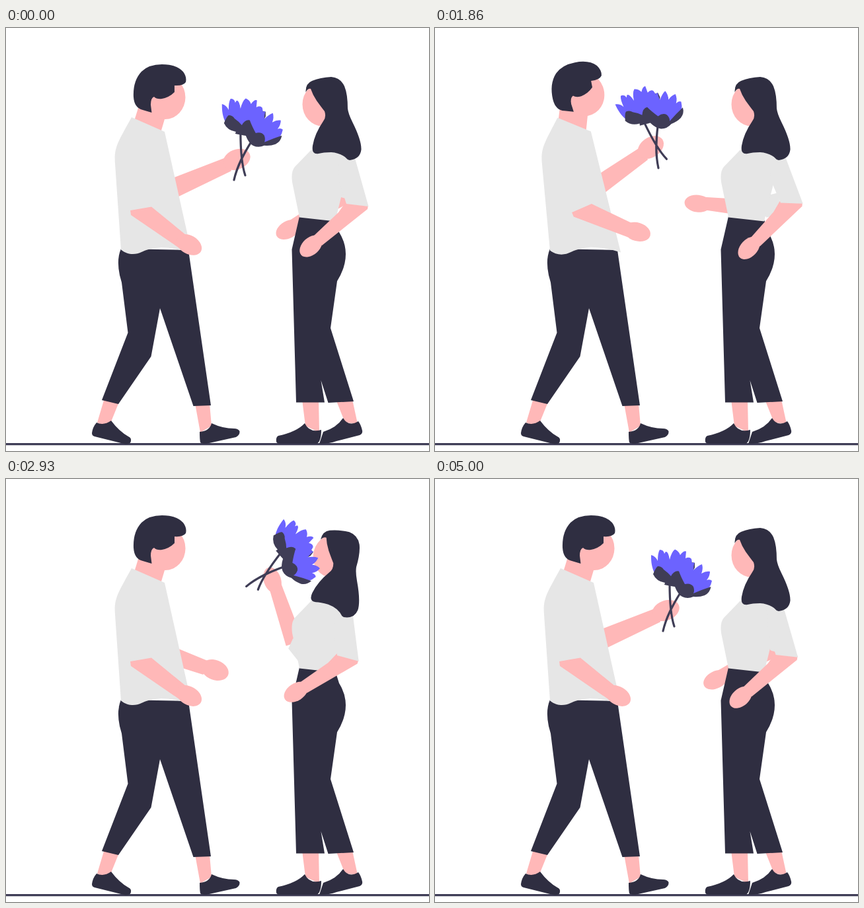
An HTML page for the animation above (5070 ms loop, 640 by 640 pixels).

```html
<!DOCTYPE html>
<html lang="en">
<head>
<meta charset="utf-8">
<title>Sharing a flower</title>
<style>
  html, body { margin: 0; width: 100%; height: 100%; overflow: hidden; background: #fff; }
  svg { display: block; width: 100%; height: 100%; }
  .dark { fill: #2f2e41; }
  .skin { fill: #ffb8b8; }
  .cloth { fill: #e6e6e6; }
  .leaf { fill: #3f3d56; }
  .petal { fill: #6c63ff; }
  .line { fill: none; stroke: #3f3d56; stroke-width: 3.2; stroke-linecap: round; }
</style>
</head>
<body>
<svg viewBox="0 0 640 640">
  <path class="line" d="M-5 629.6H645"/>

  <!-- man -->
  <g id="manFarArm" class="skin">
    <path d="M-12 -9L-96 -11L-125 -13V22L-102 18L-14 13Z"/>
    <ellipse rx="21.5" ry="15"/>
  </g>
  <path class="skin" d="M149 560L138 597Q148 603 158 598L171 566ZM286 568L294 612L311 602L308 568Z"/>
  <path class="dark" d="M137 597Q131 604 130 613Q130 617 134 618L178 629Q188 631 189 625Q190 620 185 618Q171 610 159 594Q148 602 137 597Z"/>
  <path class="dark" d="M293 611Q293 622 294 627Q296 629 303 629L348 619Q354 616 353.500 610Q351 606 345 606Q328 606 311 598Q308 610 293 611Z"/>
  <path class="dark" d="M174 334Q167 350 172 374L175 385L184.500 461L145 563L170 569L219.500 497L233 424L283.500 572L310 571L276 336Z"/>
  <g id="manHead">
    <path class="skin" d="M201 118L188 160L232 165L243 128Z"/>
    <ellipse class="skin" cx="241" cy="105" rx="30.500" ry="33"/>
    <path class="dark" d="M220.500 128L207 124Q194 121 193 104Q192 80 205 66Q216 55 236 55Q258 55 268 66Q274 74 272 82Q268 88 255 87V97Q247 105 236 107Q228 108 224 104Q219 106 219 116Z"/>
  </g>
  <path id="manShirt" class="cloth" d="M190 135L240 157L281 341Q255 332 235 332C220 333 211 336 205 339C197 343 184 344 174 335.500L165 205C163 180 170 172 190 135Z"/>
  <g id="manNearArm" class="skin">
    <path d="M188 276L220 270.500L272 313L262 333L189 283Z"/>
    <ellipse rx="20.500" ry="14" transform="translate(277 328) rotate(30)"/>
  </g>

  <!-- woman -->
  <g id="womanFarArm">
    <path class="skin" d="M9 -11L66 -14L101 -18V11L11 8.400Z"/>
    <ellipse class="skin" rx="20" ry="13"/>
    <path class="cloth" d="M94 -2L106 9L130 0L118 -30L92 -20Z"/>
  </g>
  <path class="skin" d="M448 562L453 602L474 612L473 562ZM499 562L513 597L532 599L524 562Z"/>
  <path class="dark" d="M510 590Q500 605 480 611L474 629Q490 629 500 625L535 616Q540 614 539 609Q537 600 533 595Q518 604 510 590Z"/>
  <path class="dark" d="M452 598Q440 611 412 617Q408 619 409 626Q410 629 415 629L470 629Q477 626 477 608Q459 613 452 598Z"/>
  <path class="dark" d="M444 285L432.500 335L439 566.500H482L476.500 533L487.500 567L526 565L491 454L501 383Q514 362 514 342Q514 325 504 309L498 290Z"/>
  <path class="cloth" d="M468 178L437 210Q431 217 433 233L444 286.500L498 292.500L513 232L525 195L500 172Z"/>
  <g id="womanNearArm">
    <path class="skin" d="M548 268L547 274L478 329L465 315L503 279L515 262Z"/>
    <ellipse class="skin" rx="20" ry="13" transform="translate(461.500 330) rotate(-42)"/>
    <path class="cloth" d="M528 197L548.500 270L515 266L504 233L500 180Z"/>
  </g>
  <g id="womanHead">
    <ellipse class="skin" cx="479" cy="115.500" rx="30.500" ry="33"/>
    <path class="dark" d="M453.500 97Q453 84 463 80Q475 75 492 74Q506 75 512 88Q517 100 517 122Q518 130 524 142Q538 170 537.500 184Q536 198 520 200L517 199Q508 189 492 188Q480 188 473 190Q462 192 464 178Q467 160 480 141Q485 135 482 126Q478 121 470 110Q464 101 461 92Q457 91 453.500 97Z"/>
  </g>

  <g id="flower"><g transform="translate(-357 -196)">
    <path class="line" d="M355 158C355 180 356 205 362 223M372 171C360 190 350 208 345 230"/>
    <path class="leaf" d="M388 126L393 127V134L390 140Z"/>
    <path class="petal" d="M331 140C327 130 327 122 327 115Q334 117 337 124Q337 112 340 107Q346 107 347 113L349 110Q353 109 355 122Q358 110 363 106.500Q369 109 371 115Q376 108 380 109.500L379 120Q385 117 388 121L389 127L392.500 126Q391 132 391 138Q398 131 404 129Q406 136 403 143Q410 139 416 140Q416 147 411 153Q416 151 419 154Q418 160 414 166L391 174L372 162L340 152Z"/>
    <path class="leaf" d="M330 144Q334 134 337 132Q343 132 346 137Q353 142 357 147Q362 138 369 139.500Q372 148 378 159Q387 157 391 163Q393 169 391 173Q405 167 417.500 163Q416 172 408 176Q400 179 391 178Q382 182 374 178Q367 174 363 163Q357 162 347 160L348 157Q335 155 330 144Z"/>
  </g></g>
</svg>
<script>
const LOOP = 5070;

// flower x y turn, man far arm x y turn, woman far arm x y turn,
// turns of: man head, man torso, man near arm, woman head, woman near arm
const offer  = [357, 196, 0,   349, 199, -22.5, 427, 305, -30, 0, 0, 0, 0, 0];
const smell  = [305, 150, -58, 297, 157, -49.5, 427, 305, -30, -24.6, -3, -18.5, 0, 0];
const give   = [357, 196, 0,   349, 199, -22.5, 369, 199, 35,  0, 0, -10, 0, -8.7];
const enjoy  = [394, 143, 38,  316, 289, 21,    403, 153, 72,  0, 0, 0, 16.3, 8.5];
const giveBack = give.with(11, 0);

// sideways bend of the hand paths, by pose index
const manBend = { 3: 6.75, 4: 2 };
const womanBend = { 6: 3.25, 7: 20.75 };

const moves = [
  [0, 570, offer, smell, {}],
  [1500, 2140, smell, give, womanBend],
  [2250, 2920, give, enjoy, manBend],
  [3800, 4510, enjoy, giveBack, manBend],
  [4510, 5025, giveBack, offer, womanBend],
];

function poseAt(t) {
  const [start, end, from, to, bend] = moves.findLast(m => t >= m[0]);
  const u = Math.min(1, (t - start) / (end - start));
  return from.map((v, i) => v + (to[i] - v) * u + 4 * u * (1 - u) * (bend[i] || 0));
}

const el = id => document.getElementById(id);
const place = (id, x, y, turn) =>
  el(id).setAttribute('transform', `translate(${x} ${y}) rotate(${turn})`);
const spin = (id, turn, x, y) =>
  el(id).setAttribute('transform', `rotate(${turn} ${x} ${y})`);

function draw() {
  const p = poseAt(performance.now() % LOOP);
  place('flower', ...p.slice(0, 3));
  place('manFarArm', ...p.slice(3, 6));
  place('womanFarArm', ...p.slice(6, 9));
  spin('manHead', p[9], 208.5, 184);
  spin('manShirt', p[10], 220, 338);
  spin('manNearArm', p[11], 210, 198);
  spin('womanHead', p[12], 484, 173);
  spin('womanNearArm', p[13], 502, 173);
  requestAnimationFrame(draw);
}
draw();
</script>
</body>
</html>
```
